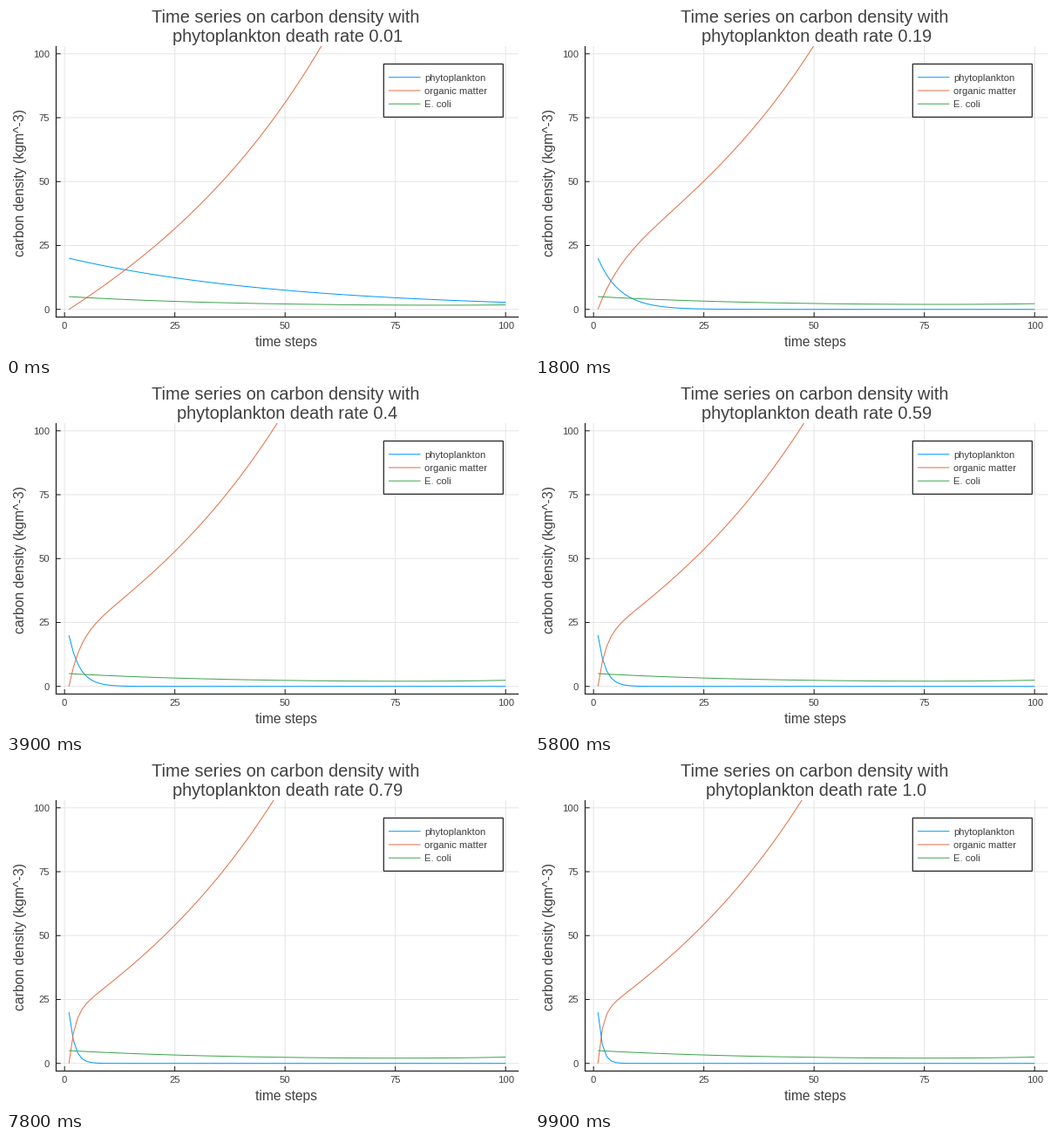
Recreate the animation shown at these times as a matplotlib script. Size 600x400 px, loop 10000 ms.

```python
import numpy as np
import matplotlib.pyplot as plt
from matplotlib.animation import FuncAnimation
from matplotlib.patches import Rectangle

plt.rcParams["font.family"] = "Liberation Sans"

FRAMES = 100
PT = 0.72  # points per pixel at 100 dpi
INK, AXIS, GRID = "#404040", "#1c1c1c", "#e5e5e5"
SERIES = [("phytoplankton", "#009afa"),
          ("organic matter", "#e36f47"),
          ("E. coli", "#3ea44e")]
LEFT, RIGHT, TOP, BOTTOM = 57.2, 588.2, 46, 356.5


def to_x(t):
    return LEFT + (t + 1.97) / 104.94 * (RIGHT - LEFT)


def to_y(v):
    return BOTTOM - (v + 3) / 106 * (BOTTOM - TOP)


def simulate(rates, sub=20):
    """Densities at steps 1..100, one row per step, one column per rate."""
    exude = 0.00745 * np.exp(-rates / 0.05)

    def phyto(t):
        return 20 * np.exp(-(rates + 0.01) * t)

    def slope(t, organic, coli):
        source = (rates + exude * (1 + t / 12)) * phyto(t)
        return (source + 0.0226 * organic + 0.16 * coli,
                (1e-4 * organic - 0.021) * coli)

    organic, coli = np.zeros_like(rates), np.full_like(rates, 5)
    rows, dt = [], 1 / sub
    for n in range(99 * sub + 1):
        t = n * dt
        if n % sub == 0:
            rows.append((phyto(t), organic, coli))
        do, dc = slope(t, organic, coli)
        do, dc = slope(t + dt / 2, organic + do * dt / 2, coli + dc * dt / 2)
        organic, coli = organic + do * dt, coli + dc * dt
    return np.array(rows)


steps = np.arange(1, 101)
density = simulate(np.arange(1, FRAMES + 1) / 100)

fig = plt.figure(figsize=(6, 4), dpi=100, facecolor="white")
ax = fig.add_axes([0, 0, 1, 1])
ax.set_xlim(0, 600)
ax.set_ylim(400, 0)
ax.axis("off")


def line(xs, ys, color, width=1.0, z=2):
    return ax.plot(xs, ys, color=color, lw=width * PT, zorder=z,
                   solid_capstyle="butt", snap=False)[0]


def label(x, y, text, size, ha="center", **kw):
    return ax.text(x, y, text, fontsize=size * PT, color=INK, ha=ha,
                   va="baseline", zorder=6, **kw)


for v in range(0, 101, 25):
    x, y = to_x(v), to_y(v)
    line([x, x], [TOP, BOTTOM], GRID, z=1)
    line([LEFT, RIGHT], [y, y], GRID, z=1)
    line([x, x], [BOTTOM, BOTTOM - 5.5], AXIS, z=4)
    line([LEFT, LEFT + 5.5], [y, y], AXIS, z=4)
    label(x, 369.6, str(v), 11.2)
    label(50.3, y + 4, str(v), 11.2, ha="right")
line([LEFT + 0.3] * 2, [TOP, BOTTOM], AXIS, 1.2, 4)
line([LEFT - 0.3, RIGHT], [BOTTOM, BOTTOM], AXIS, 1.2, 4)

label(321, 18.6, "Time series on carbon density with", 20)
title = label(322.8, 40.6, "", 20)
label(321, 390, "time steps", 15.5)
label(21.5, 202.5, "carbon density (kgm^-3)", 15.7, rotation=90,
      rotation_mode="anchor")

ax.add_patch(Rectangle((433.3, 66.5), 137, 60.8, fc="white", ec=AXIS,
                       lw=1.2 * PT, zorder=5, snap=False))
for k, (name, color) in enumerate(SERIES):
    y = 81.7 + 15.25 * k
    line([439, 475.5], [y, y], color, z=6)
    label(480, y + 3.8, name, 11.2, ha="left")

clip = Rectangle((LEFT, TOP), RIGHT - LEFT, BOTTOM - TOP, transform=ax.transData)
curves = [line([], [], color, z=3) for _, color in SERIES]
for curve in curves:
    curve.set_clip_path(clip)


def update(i):
    title.set_text(f"phytoplankton death rate {(i + 1) / 100}")
    for k, curve in enumerate(curves):
        curve.set_data(to_x(steps), to_y(density[:, k, i]))
    return [title, *curves]


anim = FuncAnimation(fig, update, frames=FRAMES, interval=100, repeat=True,
                     repeat_delay=0)
plt.show()
```
